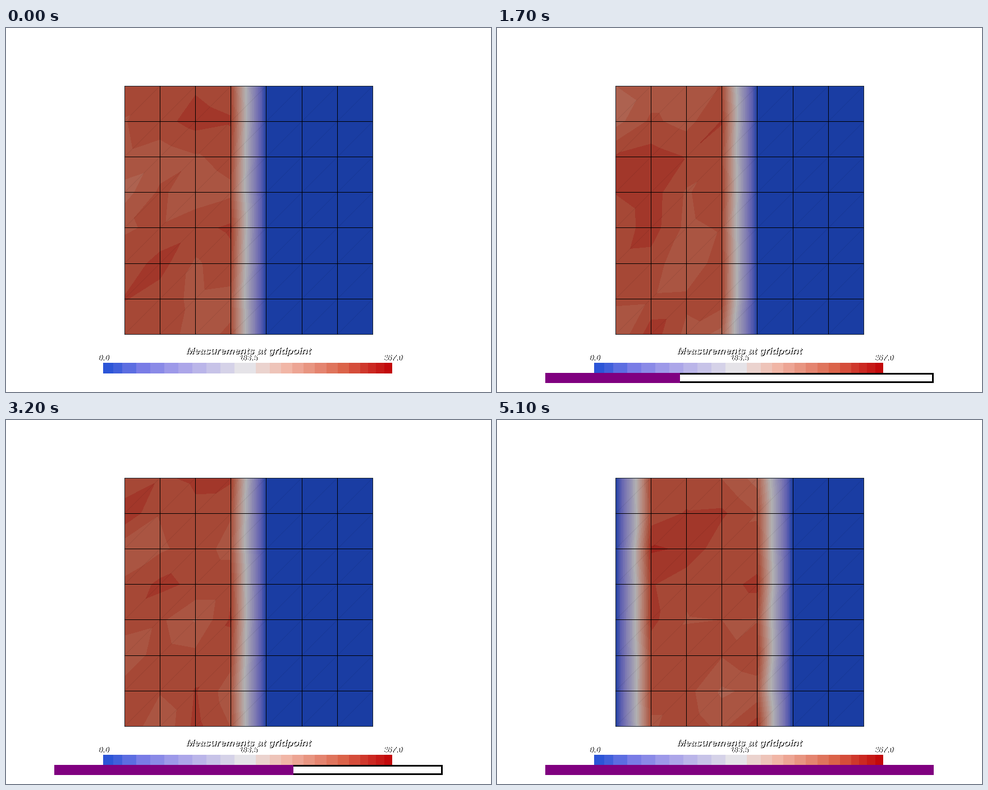
A matplotlib script for the animation above (5200 ms loop, 864 by 648 pixels).

```python
import numpy as np
import matplotlib.pyplot as plt
from matplotlib.animation import FuncAnimation
from matplotlib.colors import LinearSegmentedColormap
from matplotlib.patches import Rectangle
from matplotlib.tri import Triangulation

W, H, DPI = 864, 648, 100
FRAMES, INTERVAL = 52, 100
N, CELL, LEFT, TOP = 8, 63.2, 210.6, 102.6
SPAN = CELL * (N - 1)
BAND = 4                      # columns with readings
VMAX, MEAN, SPREAD = 367, 306, 11
SHADE = 0.765                 # lighting on the mesh

scale = LinearSegmentedColormap.from_list("diverging", [
    (0, "#2250d5"), (.13, "#767ae6"), (.25, "#a39de9"), (.5, "#e8e6e8"),
    (.64, "#f1b4a4"), (.83, "#db644a"), (1, "#c00206")])


def readings(step):
    """Grid values: a band of noisy columns that moves right and wraps."""
    rng = np.random.default_rng(step)
    grid = np.zeros((N, N))
    columns = (step + np.arange(BAND)) % N
    grid[:, columns] = rng.normal(MEAN, SPREAD, (N, BAND)).clip(0, VMAX)
    return grid.ravel()


def box(x0, y0, x1, y1, color, z):
    patch = Rectangle((x0, y0), x1 - x0, y1 - y0, fc=color, lw=0, zorder=z,
                      antialiased=False)
    return ax.add_patch(patch)


def shadow_text(x, y, text, px):
    for shift, color in ((1, "black"), (0, "white")):
        ax.text(x + shift, y + shift, text, color=color, fontsize=px * 72 / DPI,
                family="Liberation Sans", weight="bold", style="italic",
                ha="center", va="baseline", zorder=6, antialiased=False)


fig = plt.figure(figsize=(W / DPI, H / DPI), dpi=DPI, facecolor="white")
ax = fig.add_axes([0, 0, 1, 1])
ax.set_xlim(0, W)
ax.set_ylim(H, 0)
ax.axis("off")

# Mesh, every cell split along its rising diagonal
rows, cols = np.divmod(np.arange(N * N), N)
xs, ys = LEFT + 0.5 + CELL * cols, TOP + 0.5 + CELL * rows
triangles = []
for r in range(N - 1):
    for c in range(N - 1):
        a = r * N + c
        triangles += [(a, a + 1, a + N), (a + 1, a + N + 1, a + N)]
        ax.plot(xs[[a + 1, a + N]], ys[[a + 1, a + N]], color="black",
                lw=0.5, alpha=0.1, zorder=2)
mesh = Triangulation(xs, ys, triangles)

STEP = 14
levels = np.arange(-STEP / 2, VMAX + STEP, STEP)
mesh_colors = scale((levels[:-1] + STEP / 2) / VMAX)
mesh_colors[:, :3] *= SHADE

# Grid lines, one pixel wide
x0, y0 = round(LEFT), round(TOP)
x1, y1 = round(LEFT + SPAN) + 1, round(TOP + SPAN) + 1
for i in range(N):
    x, y = round(LEFT + CELL * i), round(TOP + CELL * i)
    color = "#16202a" if i in (0, N - 1) else "black"
    box(x, y0, x + 1, y1, color, 3)
    box(x0, y, x1, y + 1, color, 3)

# Colour legend: bands are wider on the blue side
KEY_X0, KEY_X1 = 173, 688
edges = np.r_[KEY_X0, 191, np.linspace(207, 407, 9), 445,
              np.linspace(470, 631, 9), np.linspace(645, KEY_X1, 4)].round()
for a, b in zip(edges, edges[1:]):
    box(a, 596, b, 615, scale(((a + b) / 2 - KEY_X0) / (KEY_X1 - KEY_X0)), 2)
shadow_text(432, 580, "Measurements at gridpoint", 17.4)
for frac in (0, 0.5, 1):
    shadow_text(KEY_X0 + 1 + frac * (KEY_X1 - KEY_X0), 591.5,
                f"{frac * VMAX:.1f}", 14)

# Progress bar
BAR_X, BAR_W, BAR_Y0, BAR_Y1, EDGE = 86, 692, 614, 632, 3
frame_box = box(BAR_X, BAR_Y0, BAR_X + BAR_W, BAR_Y1, "black", 7)
inner_box = box(BAR_X, BAR_Y0 + EDGE, BAR_X + BAR_W - EDGE, BAR_Y1 - EDGE,
                "white", 8)
fill_box = box(BAR_X, BAR_Y0, BAR_X, BAR_Y1, "#800080", 9)

surface = None


def draw(n):
    """Mesh and progress bar advance in turn, each every second frame."""
    global surface
    if surface is not None:
        surface.remove()
    surface = ax.tricontourf(mesh, readings(n // 2), levels=levels,
                             colors=mesh_colors, zorder=1)
    done = (n + 1) // 2 / (FRAMES // 2)
    fill_box.set_width(round(BAR_W * done))
    for part in (frame_box, inner_box, fill_box):
        part.set_visible(n > 0)
    return []


anim = FuncAnimation(fig, draw, frames=FRAMES, interval=INTERVAL,
                     init_func=lambda: [], repeat=True, repeat_delay=0,
                     blit=False)
plt.show()
```
